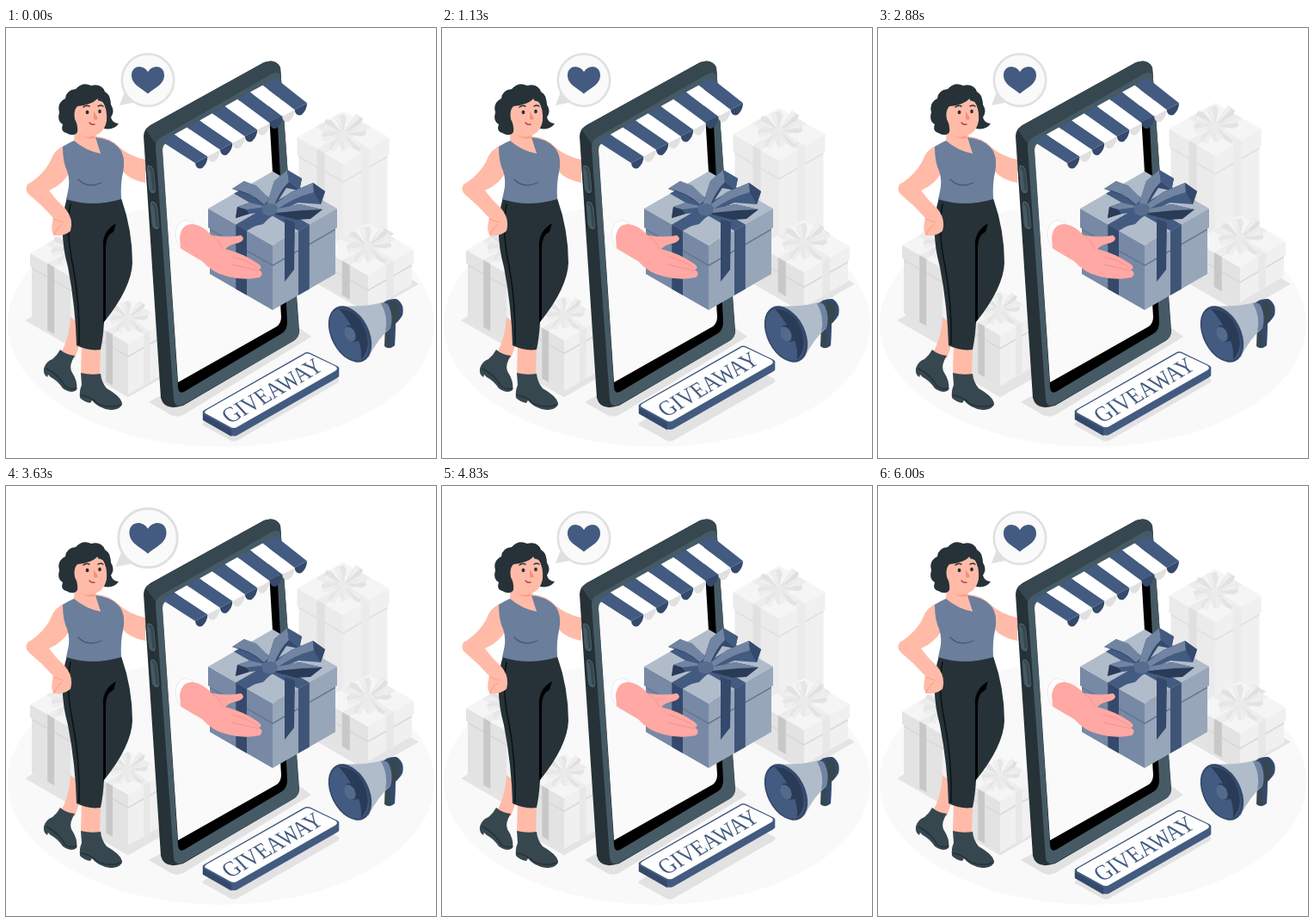
An HTML page for the animation above (6040 ms loop, 500 by 500 pixels).

```html
<!DOCTYPE html>
<html lang="en">
<head>
<meta charset="utf-8">
<title>Giveaway</title>
<style>
html, body { margin: 0; width: 100%; height: 100%; overflow: hidden; background: #fff; }
svg { display: block; width: 100%; height: 100%; }
text { font-family: "Liberation Serif", "Noto Serif", serif; }
</style>
</head>
<body>
<svg id="stage" viewBox="0 0 500 500"></svg>
<script>
const SLOPE = 0.575;
const NAVY = '#435b80', DEEP = '#34496b', DARK = '#2a3b58', MIST = '#7185a2';
const INK = '#263238', SLATE = '#37474f', STEEL = '#455a64';
const SKIN = '#ffbba8', SKIN_SHADE = '#ff9d87';

const path = (d, fill, extra = '') => `<path d="${d}" fill="${fill}" ${extra}/>`;
const line = (d, color, width = 1) =>
  path(d, 'none', `stroke="${color}" stroke-width="${width}" stroke-linecap="round" stroke-linejoin="round"`);
const poly = (points, fill) =>
  path('M' + points.map(p => p.map(n => n.toFixed(1)).join()).join('L') + 'Z', fill);
const group = (id, body) => `<g id="${id}">${body}</g>`;

const PALE = { top: '#f5f5f5', left: '#e3e3e3', right: '#f0f0f0', bandL: '#c8c8c8', bandR: '#e8e8e8', bandT: '#ededed', edge: '#d8d8d8' };
const FAINT = { top: '#f5f5f5', left: '#ebebeb', right: '#f0f0f0', bandL: '#e0e0e0', bandR: '#ebebeb', bandT: '#ededed', edge: '#e0e0e0' };
const BLUE = { top: '#b1bccb', left: '#7789a5', right: '#98a6ba', bandL: DEEP, bandR: '#3e5578', bandT: NAVY, edge: '#64778f' };

// Isometric box; (x, y) is the near corner of its top, w its half width.
function box(x, y, w, lid, depth, c) {
  const leftAt = (u, v) => [x - w * u, y - w * u * SLOPE + v];
  const rightAt = (u, v) => [x + w * u, y - w * u * SLOPE + v];
  const topAt = (u, v) => [x + w * (v - u), y - w * (u + v) * SLOPE];
  const quad = (at, u0, u1, v0, v1, fill) => poly([at(u0, v0), at(u1, v0), at(u1, v1), at(u0, v1)], fill);
  const inner = 1 - 2 / w;
  return quad(leftAt, 0, inner, 0, depth, c.left) +
    quad(rightAt, 0, inner, 0, depth, c.right) +
    quad(leftAt, 0, inner, lid, lid + 2, c.edge) +
    quad(rightAt, 0, inner, lid, lid + 2, c.edge) +
    quad(leftAt, 0, 1, 0, lid, c.left) +
    quad(rightAt, 0, 1, 0, lid, c.right) +
    quad(topAt, 0, 1, 0, 1, c.top) +
    quad(topAt, .4, .57, 0, 1, c.bandT) +
    quad(topAt, 0, 1, .4, .57, c.bandT) +
    quad(leftAt, .4, .57, 0, depth, c.bandL) +
    quad(rightAt, .4, .57, 0, depth, c.bandR);
}

function boxShadow(x, y, w, depth) {
  const r = w + 6, cy = y + depth - w * SLOPE;
  return poly([[x - r, cy], [x, cy - r * SLOPE], [x + r, cy], [x, cy + r * SLOPE]], '#e4e4e4');
}

function paleBow(x, y, size) {
  const loop = (angle, length, width, fill) =>
    `<g transform="rotate(${angle})">` +
    path(`M0,0L${length},${-width}L${length + 2},${width - 2}L${length - 4},${width}Z`, fill) +
    path(`M5,0L${length},${-width}L${length},0Z`, '#efefef') + '</g>';
  return `<g transform="translate(${x},${y}) scale(${size})">` +
    loop(40, 25, 5, '#e3e3e3') + loop(128, 22, 5, '#e6e6e6') + loop(85, 17, 5, '#e9e9e9') +
    loop(-8, 25, 6, '#e3e3e3') + loop(-45, 27, 6, '#e0e0e0') + loop(-100, 21, 7, '#e6e6e6') +
    loop(-150, 24, 7, '#e2e2e2') + loop(172, 23, 6, '#e6e6e6') +
    '<ellipse rx="6" ry="5" fill="#ebebeb"/></g>';
}

function blueBow() {
  return poly([[324, 222], [336, 226], [335, 281], [324, 295]], DEEP) +
    path('M263,187L277,178L307,198L303,208L285,195Z', DEEP) +
    path('M263,187L277,178L291,183L307,199L300,205Q284,190 263,187Z', MIST) +
    path('M303,206L312,178L327,165L344,175L341,189L326,186L311,209Z', DEEP) +
    path('M303,206L312,178L327,165L329,179Q318,189 311,209Z', MIST) +
    path('M327,165L344,175L341,189L329,179Z', NAVY) +
    path('M309,208L331,191L357,180L371,190L366,205L340,203L314,214Z', NAVY) +
    path('M309,208L331,191L357,180L358,191Q334,197 314,212Z', MIST) +
    path('M357,180L371,190L366,205L358,191Z', DEEP) +
    path('M304,208L283,203L269,208L267,221L283,216L306,214Z', NAVY) +
    path('M304,208L283,203L269,208L279,211Z', MIST) +
    path('M267,221L269,208L279,211L283,216Z', DARK) +
    path('M311,211L341,205L368,211L354,222L338,223L311,216Z', DARK) +
    path('M311,211L341,205L368,211L344,212L314,215Z', MIST) +
    path('M302,212L289,224L283,232L299,228L310,217Z', NAVY) +
    path('M297,208Q302,202 312,205Q318,208 315,215Q308,221 299,216Z', '#566d90');
}

function phone() {
  const button = (x, y) =>
    path(`M${x},${y + 4}q0,-5 5,-4q4,2 5,8l2,20q0,6 -4,6q-5,-1 -6,-7z`, STEEL, 'stroke="#1b252a"') +
    path(`M${x + 3},${y + 3}q4,2 4,8l2,19`, 'none', `stroke="${SLATE}" stroke-width="3"`);
  return path('M160,126Q160,118 168,113L300,40Q314,35 319,46L341,352Q341,360 334,364L206,439Q184,446 180,430Z', INK) +
    path('M162,118L168,113L300,40Q314,35 319,46L320,58L309,55L183,127Q176,130 175,136Z', SLATE) +
    path('M174,139Q173,131 182,126L308,54Q319,48 320,59L340.500,352Q341,360 334,364L206,438Q196,442 195,432Z', STEEL) +
    path('M182,142Q182,136 187,133L305,67Q313,63 314,71L327,342Q327,351 321,355L207,423Q201,426 200,418Z', '#000') +
    path('M182,142Q182,136 187,133L304,67L320,336Q320,343 315,347L200,412Z', '#fafafa') +
    button(163, 159) + button(167, 201);
}

function awning() {
  const n = 9, top = i => [181 + i * 14.7, 132 - i * 8.2], low = i => [220 + i * 14.45, 157 - i * 7.75];
  let out = '';
  for (let i = 0; i < n; i++) {
    const blue = i % 2 === 0, a = low(i), b = low(i + 1);
    out += path(`M${a}Q${a[0] + 1},${a[1] + 8} ${a[0] + 8},${a[1] + 6}Q${b[0]},${b[1] + 8} ${b}Z`, blue ? DEEP : '#e0e0e0');
    out += poly([top(i), top(i + 1), b, a], blue ? NAVY : '#fff');
  }
  return out;
}

function hand() {
  return path('M202,243Q204,228 217,228Q230,230 239,241Q260,244 273,241Q280,246 270,250Q259,252 255,257Q276,262 293,274Q300,279 294,281Q301,285 295,290Q278,294 258,289Q240,285 228,271Q212,262 203,256Z', '#ffa8a4') +
    line('M264,266Q280,270 293,279M262,275Q280,279 293,282M240,242Q250,248 252,257', '#f08d8a', .8);
}

function hair() {
  return path('M83,121Q79,127 70,122Q63,120 66,112Q59,108 62,98Q59,87 69,82Q70,72 81,71Q89,62 99,67Q111,64 115,74Q123,79 121,89Q119,92 116,94Q115,86 107,82Q98,90 83,91Q78,96 80,106Q84,113 83,121Z', INK);
}

function head() {
  return path('M108,74Q122,78 122,89Q127,97 122,104Q124,111 131,111Q126,119 114,117L104,100Z', INK) +
    path('M80,110L79,133Q90,147 110,147L105,124Z', SKIN) +
    path('M82,120Q90,130 103,125L103,128Q91,131 82,120Z', SKIN_SHADE) +
    path('M78,92Q94,79 113,86Q118,95 117,108Q114,123 102,125Q88,125 82,116Q76,108 78,92Z', SKIN) +
    hair() +
    line('M90,92Q93,89 97,91M107,91Q110,89 113,91', INK, 1.4) +
    `<ellipse cx="94.500" cy="98" rx="1.900" ry="2.300" fill="${INK}"/><ellipse cx="109" cy="97" rx="1.800" ry="2.200" fill="${INK}"/>` +
    path('M102,97L107,105Q105,108 102,106Z', '#f78f7c') +
    line('M97,110Q99,113 103,112', '#b4463f', 1.4);
}

function woman() {
  return path('M75,336Q74,358 65,376L80,384L92,350Z', SKIN) +
    path('M88,368L87,403L109,404L110,370Z', SKIN) +
    path('M63,374Q70,380 80,381Q73,392 76,399Q84,411 82,421Q76,426 66,419Q60,410 52,406L49,403L48,406Q43,403 44,396Q46,388 54,385Q60,380 63,374Z', SLATE) +
    line('M47,396Q62,404 69,417Q75,421 82,419', INK, 1.5) +
    path('M87,401Q98,404 110,402Q111,412 117,419Q133,428 135,436Q134,444 121,444Q107,442 100,433L98,436Q91,435 86,430Q85,422 88,415Z', SLATE) +
    line('M87,427Q98,428 107,437Q120,443 134,438', INK, 1.5) +
    path('M106,126Q122,128 131,138Q143,149 162,153L162,180Q143,176 135,166Z', SKIN) +
    path('M71,197L134,198Q147,235 147,273Q146,302 114,342Q113,360 110,374Q96,376 82,369Q81,325 72,278Q60,235 71,197Z', INK) +
    path('M128,227Q111,237 113,256L113,343L116,338L116,256Q116,241 125,237Z', '#000') +
    line('M75,205Q69,235 78,277Q86,320 85,368', '#0b1114', 1.5) +
    path('M69,136Q56,141 51,156Q42,172 25,182Q21,188 27,194Q42,206 55,221Q51,237 56,241Q67,243 75,236Q79,222 69,210Q58,200 50,189Q66,182 74,168Q78,150 69,136Z', SKIN) +
    line('M55,222L66,226M56,241Q59,232 65,229', SKIN_SHADE, 1.2) +
    head() +
    path('M79,131Q72,134 66,138Q66,156 71,166Q75,178 72,190L70,199Q100,209 134,199Q133,180 136,168Q140,148 130,138Q121,129 104,127L110,146Q93,143 79,131Z', '#6b7e9b') +
    line('M84,176Q94,187 111,180', '#455a7d', 1.3);
}

function megaphone() {
  return path('M441,345L453,341L452,369Q446,375 440,370Z', SLATE) +
    path('M446,344L453,341L452,369L447,372Z', DEEP) +
    path('M437,321Q444,314 454,315Q464,321 461,334Q456,343 447,348Z', DEEP) +
    path('M446,317Q455,316 457,325Q460,333 452,344L447,348Q450,330 446,317Z', SLATE) +
    path('M386,323Q416,325 438,319Q450,328 447,349Q433,360 421,384Z', '#b1bccb') +
    path('M436,320Q442,318 445,323Q451,336 447,349L441,353Q445,336 436,320Z', MIST) +
    '<g transform="translate(400,356) rotate(-27)">' +
    `<ellipse rx="22" ry="35" fill="${DEEP}"/><ellipse cx="-1" rx="19.500" ry="32.500" fill="${NAVY}"/>` +
    path('M2,-32Q21,-22 18,5Q14,28 -2,32Q12,12 2,-32Z', DARK) + '</g>' +
    path('M396,346L407,345Q415,352 410,364L402,365Z', DARK) +
    '<ellipse cx="400" cy="356" rx="6" ry="9" transform="rotate(-25 400 356)" fill="#536a8d"/>';
}

// Rounded parallelogram of the sign, shrunk by an inset.
function plate(inset, dy) {
  const k = inset;
  return `M${231 + k * 1.7},${444 + dy}L${346 + k * .3},${378.5 + k + dy}Q350,${376 + k + dy} 354,${378 + k + dy}` +
    `L${385 - k * 1.7},${393 + dy}Q${390 - k * 1.7},${396 + dy} ${385 - k * 1.7},${399 + dy}` +
    `L${270 - k * .3},${465 - k + dy}Q265,${468 - k + dy} 260,${465 - k + dy}L${231 + k * 1.7},${449 + dy}Q${226 + k * 1.7},${447 + dy} ${231 + k * 1.7},${444 + dy}Z`;
}

function sign() {
  const side = [8, 6, 4, 2, 0].map(dy => path(plate(0, dy), NAVY)).join('');
  return side + path('M229,449L262,467L262,475L229,456Z', DEEP) +
    path(plate(1.5, 0), '#fff') +
    `<text transform="matrix(.86 -.5 .78 .83 309.500 422)" y="8" font-size="24.500" text-anchor="middle" fill="${NAVY}">GIVEAWAY</text>`;
}

function bubble() {
  return path('M138,74L132,90L152,86Z', '#e0e0e0') +
    '<circle cx="165" cy="60.500" r="30.200" fill="#fafafa" stroke="#e0e0e0" stroke-width="2.600"/>' +
    path('M165,76.500C158,70 146,66 146,55C146,43 160,42 165,51C170,42 184,43 184,55C184,66 172,70 165,76.500Z', NAVY);
}

const backGifts = [
  { x: 392, y: 158, w: 53.5, lid: 20, depth: 112, c: FAINT, bow: 1 },
  { x: 421, y: 288, w: 53, lid: 16, depth: 40, c: PALE, bow: 1 },
  { x: 75, y: 289, w: 47, lid: 15, depth: 78, c: PALE, bow: .9 },
  { x: 142, y: 367, w: 45, lid: 14, depth: 59, c: PALE, bow: .85 }
];

const stage = document.getElementById('stage');
stage.innerHTML =
  '<ellipse cx="250" cy="344" rx="248" ry="143" fill="#f9f9f9"/>' +
  backGifts.map((g, i) =>
    boxShadow(g.x, g.y, g.w, g.depth) +
    group('gift' + i, box(g.x, g.y, g.w, g.lid, g.depth, g.c) + paleBow(g.x, g.y - g.w * SLOPE - 4, g.bow))).join('') +
  path('M166,435L182,426L340,348L355,359L206,450Q198,454 190,449Z', '#e2e2e2') +
  woman() + phone() + awning() +
  '<ellipse cx="211" cy="242" rx="13.500" ry="18.500" transform="rotate(-12 211 242)" fill="#fff" stroke="#ebebeb"/>' +
  box(310, 253, 75, 22, 75, BLUE) + blueBow() + hand() +
  path(plate(0, 14), '#e2e2e2') +
  group('sign', sign()) + megaphone() + group('bubble', bubble());

const gifts = backGifts.map((_, i) => document.getElementById('gift' + i));
const signEl = document.getElementById('sign');
const bubbleEl = document.getElementById('bubble');

const LOOP = 6040;
const lift = (t, period) => -10 * (1 - Math.abs(1 - 2 * (t % period) / period));

// Two linear beats per three seconds, then a rest.
function beat(t) {
  const p = (t % 3000) / 3000;
  if (p < .1) return p / .1;
  if (p < .3) return (.3 - p) / .2;
  return Math.max(0, 1 - Math.abs(p - .5) / .1);
}

function draw(t) {
  for (const g of gifts) g.setAttribute('transform', `translate(0,${lift(t, 6000)})`);
  signEl.setAttribute('transform', `translate(0,${lift(t, 3000)})`);
  bubbleEl.setAttribute('transform', `translate(165,60.5) scale(${1 + .3 * beat(t)}) translate(-165,-60.5)`);
}

const start = performance.now();
function tick() {
  draw((performance.now() - start) % LOOP);
  requestAnimationFrame(tick);
}
draw(0);
requestAnimationFrame(tick);
</script>
</body>
</html>
```
